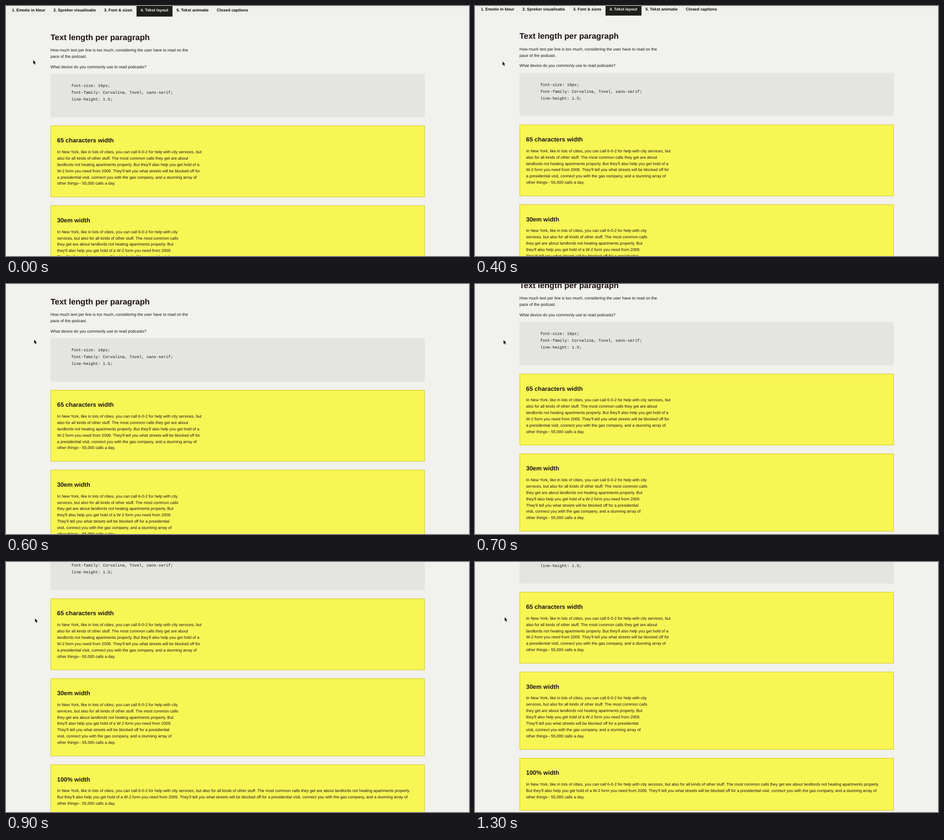
Recreate the animation shown at these times as an HTML page. Size 1017x550 px, loop 1.4 s.

```html
<!DOCTYPE html>
<html lang="en">
<head>
<meta charset="utf-8">
<title>Text length per paragraph</title>
<style>
  html, body { margin: 0; width: 100%; height: 100%; overflow: hidden; background: #f1f1ed; }
  svg { display: block; width: 1017px; height: 550px; }
  text {
    font: 8.889px "Liberation Sans", sans-serif;
    fill: #1c1217;
    text-rendering: geometricPrecision;
    white-space: pre;
  }
  .h1 { font-size: 17.778px; font-weight: 700; }
  .h2 { font-size: 13.333px; font-weight: 700; }
  .tab { font-weight: 700; fill: #0b0b09; }
  .active { fill: #f4f4f0; }
  .code { font-family: "Liberation Mono", monospace; }
</style>
</head>
<body>
<svg viewBox="0 0 1017 550">
  <g id="page"></g>
  <g id="cursor">
    <path d="M0 0V8.6L1.9 6.8L3.3 10L4.8 9.3L3.4 6.3H6Z"
      fill="#111" stroke="#fff" stroke-width=".7" stroke-linejoin="round" paint-order="stroke"/>
  </g>
</svg>
<script>
const page = document.getElementById("page");
const cursor = document.getElementById("cursor");

function add(tag, attrs, label = "") {
  const el = document.createElementNS("http://www.w3.org/2000/svg", tag);
  for (const key in attrs) el.setAttribute(key, attrs[key]);
  el.textContent = label;
  page.append(el);
}
const box = (x, y, width, height, fill, more) =>
  add("rect", { x, y, width, height, fill, ...more });
const write = (x, y, label, style = "body") => add("text", { x, y, class: style }, label);
const lines = (x, y, gap, rows, style) =>
  rows.forEach((row, i) => write(x, y + i * gap, row, style));

const LEFT = 97.8, WIDTH = 822.2, LINE = 13.889;

// Navigation
box(4, -20, 1009, 43.3, "#efefeb");
box(286.7, -20, 79, 43.3, "#1f1e1a");
[
  [12.9, "1. Emotie in kleur"],
  [104.2, "2. Spreker visualisatie"],
  [215.4, "3. Font & sizes"],
  [295.5, "4. Tekst layout", "tab active"],
  [374.4, "5. Tekst animatie"],
  [463.1, "Closed captions"]
].forEach(([x, label, style = "tab"]) => write(x, 12.3, label, style));

// Introduction
write(LEFT, 74.6, "Text length per paragraph", "h1");
lines(LEFT, 100.1, LINE, [
  "How much text per line is too much, considering the user have to read on the",
  "pace of the podcast."
]);
write(LEFT, 136.6, "What device do you commonly use to read podcasts?");

box(LEFT, 149.5, WIDTH, 95.3, "#e4e5e0");
lines(143.5, 178, 15, [
  "font-size: 16px;",
  "font-family: Corvalina, Tovel, sans-serif;",
  "line-height: 1.5;"
], "code");

// Cards
function card(top, title, rows) {
  const height = 74.2 + rows.length * LINE, edge = 1.3;
  box(LEFT + edge / 2, top + edge / 2, WIDTH - edge, height - edge, "#f8f655",
    { stroke: "#dccd2c", "stroke-width": edge });
  write(112.3, top + 37.2, title, "h2");
  lines(112.3, top + 61, LINE, rows);
  return top + height + 18.1;
}

const second = card(263, "65 characters width", [
  "In New York, like in lots of cities, you can call 6-0-2 for help with city services, but",
  "also for all kinds of other stuff. The most common calls they get are about",
  "landlords not heating apartments properly. But they'll also help you get hold of a",
  "W-2 form you need from 2009. They'll tell you what streets will be blocked off for",
  "a presidential visit, connect you with the gas company, and a stunning array of",
  "other things-- 55,000 calls a day."
]);
const third = card(second, "30em width", [
  "In New York, like in lots of cities, you can call 6-0-2 for help with city",
  "services, but also for all kinds of other stuff. The most common calls",
  "they get are about landlords not heating apartments properly. But",
  "they'll also help you get hold of a W-2 form you need from 2009.",
  "They'll tell you what streets will be blocked off for a presidential",
  "visit, connect you with the gas company, and a stunning array of",
  "other things-- 55,000 calls a day."
]);
card(third, "100% width", [
  "In New York, like in lots of cities, you can call 6-0-2 for help with city services, but also for all kinds of other stuff. The most common calls they get are about landlords not heating apartments properly.",
  "But they'll also help you get hold of a W-2 form you need from 2009. They'll tell you what streets will be blocked off for a presidential visit, connect you with the gas company, and a stunning array of",
  "other things-- 55,000 calls a day."
]);

// Time in ms, scroll distance, cursor x and y
const LOOP = 1400;
const steps = [
  [0, 0, 59.8, 119],
  [300, 0, 60.4, 122],
  [400, 2.2, 60.5, 122],
  [500, 10.6, 60.9, 122],
  [600, 30, 61.8, 122.5],
  [700, 65.6, 62.7, 123.1],
  [800, 141.1, 63.7, 123.9],
  [900, 182.8, 63.8, 124],
  [1000, 194, 64, 124.3],
  [1100, 197.2, 64.2, 124.6],
  [1300, 197.2, 65.2, 121.4]
];

function draw() {
  const time = performance.now() % LOOP;
  const [, scroll, x, y] = steps.findLast(([start]) => start <= time);
  page.setAttribute("transform", `translate(0 ${-scroll})`);
  cursor.setAttribute("transform", `translate(${x} ${y})`);
  requestAnimationFrame(draw);
}
draw();
</script>
</body>
</html>
```
